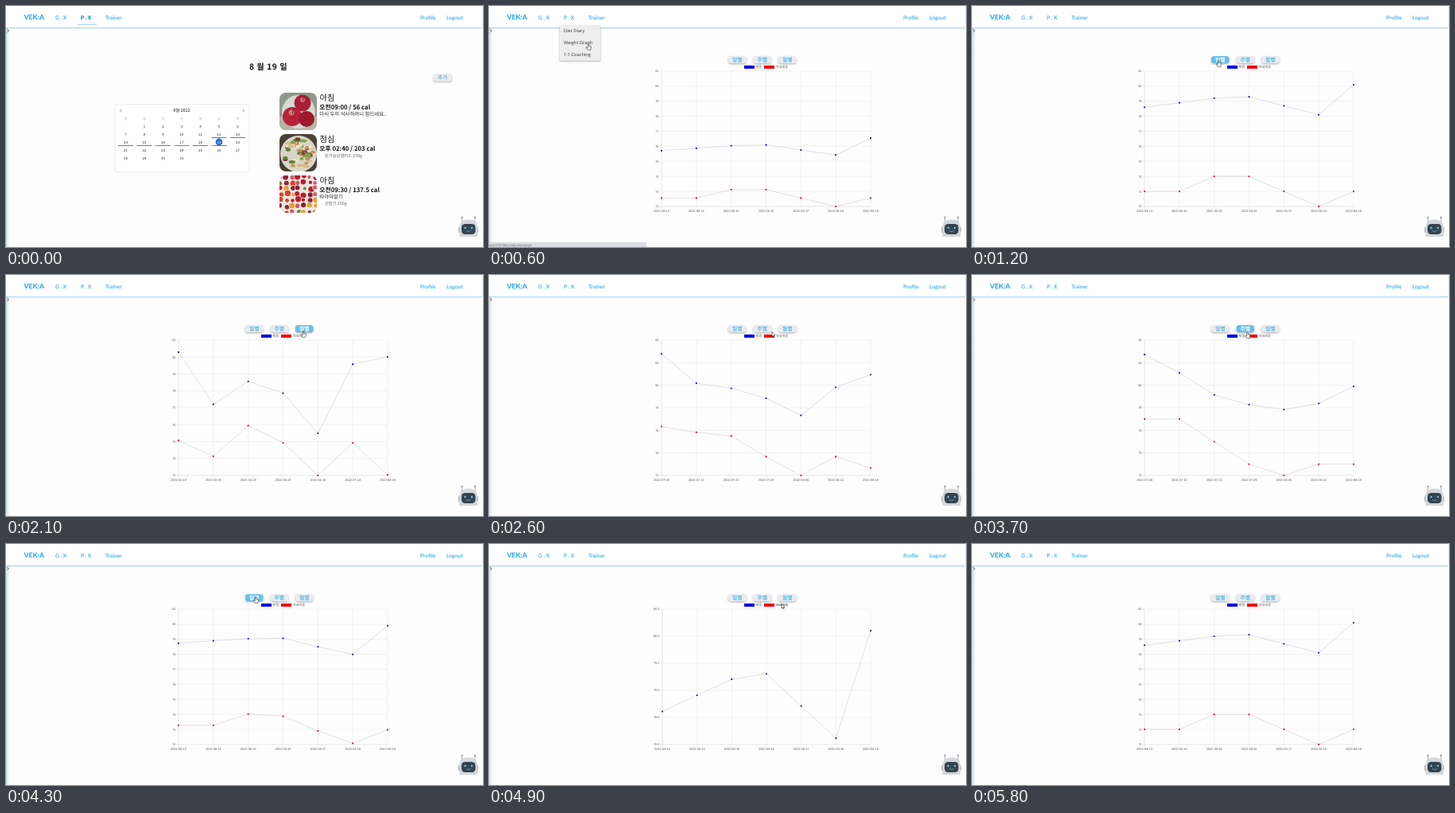
Write an HTML page that moves like this. It is 600x303 px and loops after 5900 ms.

```html
<!DOCTYPE html>
<html lang="en">
<head>
<meta charset="utf-8">
<title>Weight graph demo</title>
<style>
html, body { margin: 0; width: 100%; height: 100%; overflow: hidden; background: #fdfdfe; }
svg { display: block; width: 600px; height: 303px; }
text { font-family: "Noto Sans CJK KR", "Noto Sans CJK", sans-serif; text-rendering: geometricPrecision; }
.nav { font: 700 6.7px Lato, sans-serif; fill: #43b5ee; }
.menu { font: 5.7px "Open Sans", sans-serif; fill: #333; }
.axis { font: 3.9px "Liberation Sans", Arial, sans-serif; fill: #555; }
.mid { text-anchor: middle; }
</style>
</head>
<body>
<svg id="stage" viewBox="0 0 600 303"></svg>
<script>
const LOOP = 5900, STEP = 100, EASE_MS = 500;
const TOP = 82, BASE = 252, RIGHT = 480;
const BLUE = '#0000dc', RED = '#e80000';

const text = (x, y, s, size, fill = '#111', extra = '') =>
  `<text x="${x}" y="${y}" font-size="${size}" fill="${fill}" ${extra}>${s}</text>`;
const styled = (x, y, s, cls) => `<text x="${x}" y="${y}" class="${cls}">${s}</text>`;
const rect = (x, y, w, h, fill, extra = '') =>
  `<rect x="${x}" y="${y}" width="${w}" height="${h}" fill="${fill}" ${extra}/>`;
const circle = (x, y, r, fill, extra = '') =>
  `<circle cx="${x}" cy="${y}" r="${r}" fill="${fill}" ${extra}/>`;
const line = (x1, y1, x2, y2, stroke, w = 0.5) =>
  `<path d="M${x1} ${y1}L${x2} ${y2}" stroke="${stroke}" stroke-width="${w}"/>`;
const curve = (d, stroke, w, extra = '') =>
  `<path d="${d}" fill="none" stroke="${stroke}" stroke-width="${w}" ${extra}/>`;
const lerp = (a, b, k) => a + (b - a) * k;
const BOLD = 'font-weight="700"', MID = 'text-anchor="middle"';

function seeded(seed) {
  return () => (seed = (seed * 16807) % 2147483647) / 2147483647;
}

function button(x, y, w, h, label, size, hot) {
  return rect(x, y, w, h, hot ? '#66c1e9' : '#ebebed', 'rx="3.5" filter="url(#drop)"') +
    text(x + w / 2, y + h / 2 + size * 0.36, label, size, hot ? '#fff' : '#55b8ea', `${BOLD} ${MID}`);
}

// ---- fixed page parts ----
function header() {
  return rect(-2, -4, 601, 31, '#fff', 'filter="url(#bar)"') +
    line(0, 27.3, 599, 27.3, '#a3d6f2', 0.8) +
    text(22.5, 17, 'VEK:A', 8.6, '#36b0ee', 'font-weight="900" style="font-family:Lato,sans-serif"') +
    styled(62, 17, 'G . X', 'nav') + styled(94, 17, 'P . X', 'nav') +
    styled(125, 17, 'Trainer', 'nav') + styled(521, 17, 'Profile', 'nav') +
    styled(554, 17, 'Logout', 'nav');
}

function sidebar() {
  return rect(0, 28, 5, 275, 'url(#side)') + curve('M1.5 29.3L3.4 31L1.5 32.8', '#223', 0.8);
}

function robot() {
  return curve('M573.5 266V273M590 266V273', '#a9adb3', 1) +
    circle(573.5, 265.8, 1.1, '#8b9097') + circle(590, 265.8, 1.1, '#8b9097') +
    rect(569, 277, 25, 9, '#b5b9be', 'rx="3"') +
    '<path d="M570.5 290V277Q571 268.5 581.7 268.5T593 277V290Z" fill="#d3d6da"/>' +
    rect(573, 274, 17.5, 13, '#35434f', 'rx="4.5"') +
    circle(577.6, 279, 1.2, '#5cd0e6') + circle(586, 279, 1.2, '#5cd0e6') +
    curve('M579 282.5Q581.8 285 584.6 282.5', '#5cd0e6', 0.7);
}

// ---- diary page ----
function calendar() {
  const col = i => 150.5 + 23.5 * i;
  let s = rect(137, 123.5, 169, 85, '#fff', 'rx="3" stroke="#dcdfe3" stroke-width=".6"') +
    text(221, 133.4, '8월 2022', 5.5, '#222', MID) +
    curve('M145.5 129.3L143.5 131.3L145.5 133.3M297.5 129.3L299.5 131.3L297.5 133.3', '#555', 0.6);
  [...'일월화수목금토'].forEach((d, i) => s += text(col(i), 142.5, d, 4, '#a2a8b0', MID));
  for (let day = 1; day <= 31; day++) {
    const x = col(day % 7), y = 151 + 10 * Math.floor(day / 7);
    if (day > 11 && day < 20)
      s += line(x - 9.5, y + 4.5, x + 9.5, y + 4.5, day === 17 ? '#c4505a' : '#3c6fa8', 0.9);
    if (day === 19) s += circle(x, y, 4.4, '#2468d0');
    s += text(x, y + 1.6, day, 4.4, day === 19 ? '#fff' : '#222', MID);
  }
  return s;
}

function apples() {
  return rect(0, 0, 47, 47, '#8f9a8e') + rect(0, 30, 47, 17, '#b6b7a5') +
    circle(24, 24, 21, '#d7d9d2') +
    circle(29, 13, 10.5, '#a91f35') + circle(16, 30, 12, '#b52338') + circle(34, 33, 10, '#9c1930') +
    circle(29, 9, 3, '#d8707a') + circle(15, 25, 3.4, '#da7a80') +
    curve('M29 10L31 4M16 27L18 20', '#4e3325', 1);
}

function salad() {
  const rnd = seeded(41), tones = ['#5f7f35', '#87a34b', '#d9b98c', '#c98f5e', '#efe2c6', '#7b3a35'];
  let s = rect(0, 0, 47, 47, '#4a4136') + circle(24, 25, 23, '#d9d5c8');
  for (let i = 0; i < 46; i++) {
    const a = rnd() * 6.28, r = 19 * Math.sqrt(rnd());
    s += `<ellipse cx="${24 + r * Math.cos(a)}" cy="${25 + r * Math.sin(a)}" rx="${2 + rnd() * 3}" ry="2" fill="${tones[i % 6]}"/>`;
  }
  return s;
}

function bowls() {
  const rnd = seeded(17), tones = ['#b81f2c', '#d8442f', '#e0a33c', '#8b2430', '#c9606a', '#6e8b3d'];
  let s = rect(0, 0, 47, 47, '#ece5dc');
  for (let i = 0; i < 49; i++) {
    const x = (i % 7) * 7.4 + rnd() * 3, y = Math.floor(i / 7) * 7.4 + rnd() * 3, r = 2.2 + rnd() * 1.6;
    s += circle(x, y, r + 0.6, '#fff') + circle(x, y, r, tones[Math.floor(rnd() * 6)]);
  }
  return s;
}

function meal(y, photo, name, info) {
  return `<g transform="translate(344 ${y})" clip-path="url(#photo)">${photo}</g>` +
    text(394.5, y + 10.3, name, 10.3, '#111', 'font-weight="500"') +
    text(394.3, y + 21.3, info, 7.8, '#111', BOLD);
}

function diary() {
  return text(330, 80, '8 월 19 일', 10.2, '#111', `${BOLD} ${MID} letter-spacing=".55"`) +
    button(537.5, 85.5, 23.5, 9, '추가', 6.4) + calendar() +
    meal(109, apples(), '아침', '오전09:00 / 56 cal') +
    text(394.3, 138.2, '다시 두끼 식사하려니 힘드네요..', 6.4, '#222', 'font-weight="500"') +
    meal(161, salad(), '점심', '오후 02:40 / 203 cal') +
    text(401, 190, '닭가슴살샐러드 250g', 5.3, '#666') +
    meal(213, bowls(), '아침', '오전09:30 / 137.5 cal') +
    text(394.3, 242, '따아아알기', 6.4, '#222', 'font-weight="500"') +
    text(401, 250, '산딸기 250g', 5.3, '#666');
}

// ---- chart page ----
const data = {
  day: {
    labels: [13, 14, 15, 16, 17, 18, 19].map(d => '2022-08-' + d),
    weight: [78.6, 78.9, 79.2, 79.3, 78.7, 78.1, 80.1], goal: [73, 73, 74, 74, 73, 72, 73],
    both: [72, 81, 1], solo: [78, 80.5, 0.5]
  },
  week: {
    labels: ['07-08', '07-15', '07-22', '07-29', '08-05', '08-12', '08-19'].map(d => '2022-' + d),
    weight: [82.7, 81.2, 79.4, 78.6, 78.2, 78.7, 80.1], goal: [77, 77, 75, 73, 72, 73, 73],
    both: [72, 84, 2], solo: [78, 83, 0.5]
  },
  month: {
    labels: [2, 3, 4, 5, 6, 7, 8].map(m => `2022-0${m}-19`),
    weight: [80.3, 77.1, 78.6, 77.9, 75.4, 79.7, 80.1], goal: [75, 74, 76, 75, 73, 75, 73],
    both: [73, 81, 1]
  }
};

// each click: time, period, goal line hidden
const views = [
  [507, 'day'], [1450, 'week'], [1840, 'month'], [2480, 'week'], [2765, 'week', true],
  [3450, 'week'], [4080, 'day'], [4550, 'day', true], [4950, 'day']
].map(([at, period, solo]) => ({ at, solo, set: data[period], axis: data[period][solo ? 'solo' : 'both'] }));

views.forEach((v, i) => {
  const [lo, hi] = v.axis, before = views[i - 1];
  const toY = n => BASE - (n - lo) / (hi - lo) * (BASE - TOP);
  v.left = v.solo ? 218 : 217;
  v.weight = v.set.weight.map(toY);
  v.goal = v.solo ? before.goal : v.set.goal.map(toY);
});

const flat = Array(7).fill(BASE);
const start = { left: 217, weight: flat, goal: flat };

function series(from, to, left, k, key, color, opacity = 1) {
  const pts = to[key].map((y, i) => [lerp(left, RIGHT, i / 6), lerp(from[key][i], y, k)]);
  return `<g opacity="${opacity}">` +
    curve('M' + pts.map(p => p.join(' ')).join('L'), '#c8c8c8', 0.55) +
    pts.map(([x, y]) => circle(x, y, 1.05, color)).join('') + '</g>';
}

function legend(solo) {
  return rect(321, 74.8, 13, 4, BLUE) + text(335.3, 78.3, '체중', 4.3, '#666') +
    rect(346, 74.8, 13, 4, '#f20000') + text(361, 78.3, '목표체중', 4.1, '#666') +
    (solo ? line(360.5, 76.8, 376.5, 76.8, '#555', 0.5) : '');
}

function chart(t) {
  const n = views.filter(v => v.at <= t).length - 1;
  const v = views[n], from = views[n - 1] || start;
  const p = Math.min(1, (t - v.at) / EASE_MS), k = 1 - (1 - p) ** 4;
  const [lo, hi, step] = v.axis, rows = Math.round((hi - lo) / step);
  let s = legend(v.solo);
  for (let i = 0; i <= rows; i++) {
    const y = lerp(BASE, TOP, i / rows);
    s += line(v.left - 3, y, RIGHT, y, i ? '#e6e6e8' : '#cfcfd2') +
      text(v.left - 3.5, y + 1.4, (lo + i * step).toFixed(step < 1 ? 1 : 0), 3.9, '#555', 'class="axis" text-anchor="end"');
  }
  v.set.labels.forEach((label, i) => {
    const x = lerp(v.left, RIGHT, i / 6);
    s += line(x, TOP, x, BASE + 3, i ? '#e6e6e8' : '#cfcfd2') + styled(x, 259.2, label, 'axis mid');
  });
  const left = lerp(from.left, v.left, k);
  if (!v.solo) s += series(from, v, left, k, 'goal', RED, from.solo ? k : 1);
  return s + series(from, v, left, k, 'weight', BLUE);
}

// ---- pointer ----
const path = [
  [100, 103, 12], [200, 105, 24], [400, 125, 47], [700, 125, 47], [1200, 310, 68], [1300, 342, 68],
  [1500, 342, 68], [1800, 374, 70], [2200, 374, 70], [2400, 344, 68], [2500, 344, 68], [2700, 368, 75],
  [3500, 368, 75], [4000, 314, 66], [4300, 314, 66], [4500, 368, 75], [5000, 368, 75], [5500, 420, 120]
];

function pointer(t) {
  const i = path.findIndex(p => p[0] > t);
  if (i < 1) return null;
  const [a, b] = [path[i - 1], path[i]], k = (t - a[0]) / (b[0] - a[0]);
  return { x: lerp(a[1], b[1], k), y: lerp(a[2], b[2], k) };
}

const HAND = 'M-.7 .6Q0-.4 .7 .6V3.2L3.4 3.8V6L2.7 8.2H-.8L-3 5.2Q-2.6 4.2-.7 5.4Z';
const ARROW = 'M0 0V6L1.4 4.8L2.3 6.8L3.1 6.4L2.3 4.5H4.1Z';

function cursor(pos, hand) {
  return `<path transform="translate(${pos.x} ${pos.y})" d="${hand ? HAND : ARROW}" fill="#fff" stroke="#222" stroke-width=".6"/>`;
}

function menu(opacity) {
  return `<g opacity="${opacity}">` + rect(89, 24, 51, 44.5, '#ededee', 'filter="url(#drop)"') +
    styled(94, 33.3, 'Diet Diary', 'menu') + styled(94, 48.2, 'Weight Graph', 'menu') +
    styled(94, 63.2, '1:1 Coaching', 'menu') + '</g>';
}

function statusBar() {
  return rect(0, 297, 198, 6, '#d9dce0') +
    text(0, 301.6, 'ttps://i7b108.p.ssafy.io/px/graph', 3.6, '#555', 'style="font-family:\'Open Sans\',sans-serif"');
}

function graphPage(t, pos) {
  const s = ['일별', '주별', '월별'].map((label, i) => {
    const x = 301 + 31.5 * i;
    const hot = pos && pos.x > x && pos.x < x + 22.5 && pos.y > 62 && pos.y < 73;
    return { svg: button(x, 63, 22.5, 9, label, 6.8, hot), hot };
  });
  return { svg: s.map(b => b.svg).join('') + chart(t), hot: s.some(b => b.hot) };
}

const defs = `<defs>
  <filter id="drop" x="-20%" y="-20%" width="140%" height="160%"><feDropShadow dx="0" dy="1" stdDeviation=".8" flood-color="#555" flood-opacity=".5"/></filter>
  <filter id="bar" x="-2%" width="104%" height="130%"><feDropShadow dx="0" dy=".6" stdDeviation=".8" flood-color="#6f9db5" flood-opacity=".5"/></filter>
  <linearGradient id="side"><stop offset="0" stop-color="#cfe0e6"/><stop offset=".5" stop-color="#e8f1f4"/><stop offset="1" stop-color="#fdfdfe"/></linearGradient>
  <clipPath id="photo"><rect width="47" height="47" rx="8"/></clipPath>
</defs>`;
const frame = rect(0, 0, 600, 303, '#fdfdfe') + sidebar() + header() + robot();
const diaryPage = diary();
const menuFade = { 100: 0.5, 700: 0.4 };

function render(t) {
  const pos = pointer(t);
  const page = t < views[0].at ? { svg: diaryPage } : graphPage(t, pos);
  let s = defs + frame + page.svg;
  if (t < 300) s += line(89.5, 23.3, 114, 23.3, '#7cc3ea', 0.8) + text(94, 17, 'P . X', 6.7, '', 'class="nav" style="fill:#2496d6"');
  if (t >= 100 && t <= 700) s += menu(menuFade[t] || 1);
  if (t >= 300 && t <= 700) s += statusBar();
  if (pos) s += cursor(pos, t <= 700 || page.hot);
  stage.innerHTML = s;
}

const stage = document.getElementById('stage');
const origin = performance.now();
let shown = -1;
function tick() {
  const t = Math.floor(((performance.now() - origin) % LOOP) / STEP) * STEP;
  if (t !== shown) render(shown = t);
  requestAnimationFrame(tick);
}
tick();
</script>
</body>
</html>
```
